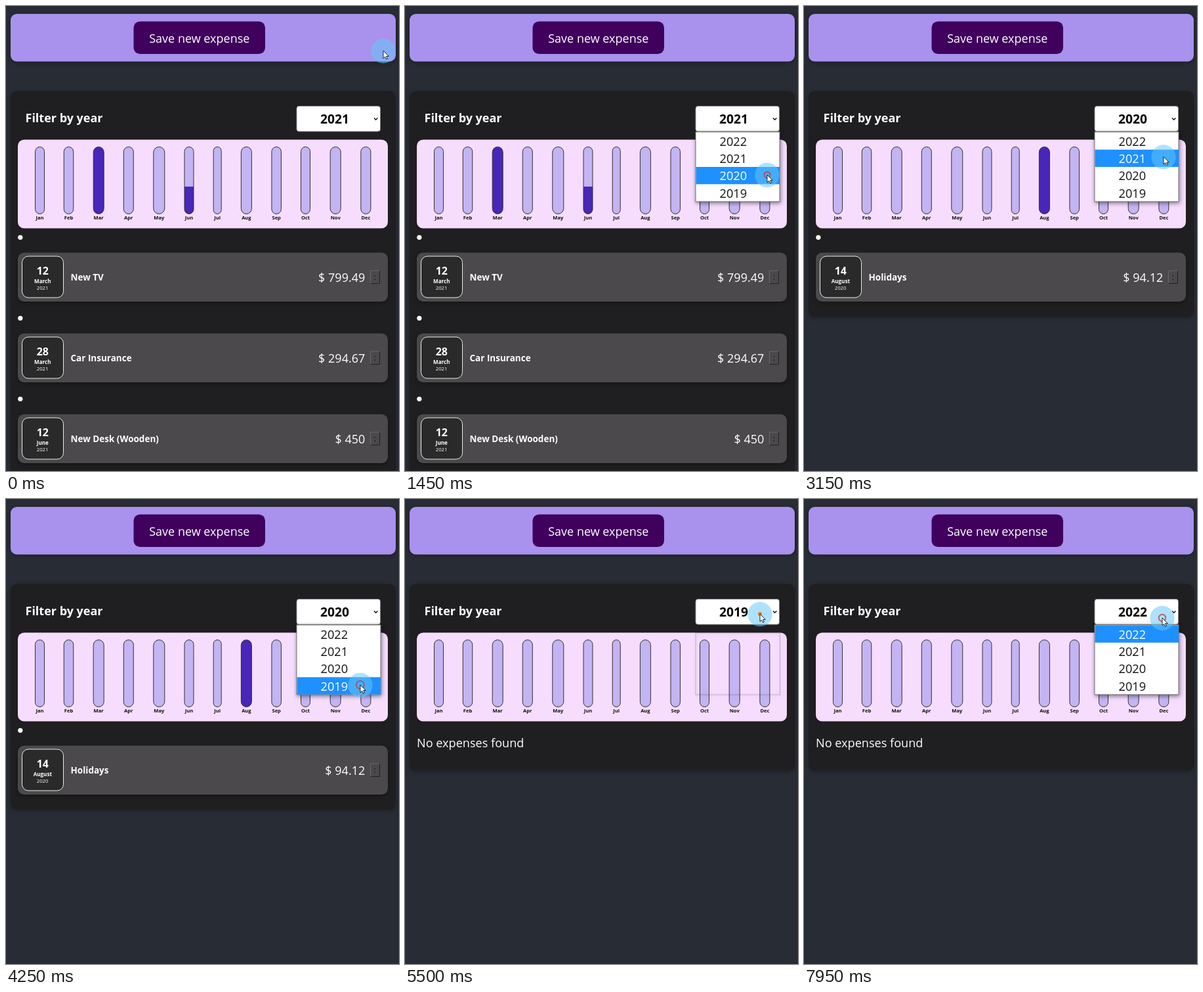
Write an HTML page that moves like this. It is 599 px wide and 708 px high and loops after 8000 ms.

```html
<!DOCTYPE html>
<html lang="en">
<head>
<meta charset="utf-8">
<title>Expenses</title>
<style>
html, body { margin: 0; width: 100%; height: 100%; overflow: hidden; background: #282c34; }
svg { display: block; font-family: "Open Sans", "Noto Sans", sans-serif; }
.card { filter: drop-shadow(0 2px 3px rgba(0, 0, 0, .3)); }
.menu { filter: drop-shadow(1px 2px 3px rgba(0, 0, 0, .5)); }
</style>
</head>
<body>
<svg id="stage" width="599" height="708" viewBox="0 0 599 708"></svg>
<script>
const LOOP = 8000;
const MONTHS = 'Jan Feb Mar Apr May Jun Jul Aug Sep Oct Nov Dec'.split(' ');
const BAR_X = [51.5, 95.5, 141.2, 186.8, 233.3, 279, 322.2, 366.4, 412.2, 456.5, 502.2, 548.4];
const BAR_W = [14, 14.5, 16, 15, 17, 14, 12, 16, 14.5, 14, 16, 15];
const YEARS = [2022, 2021, 2020, 2019];
const ITEMS = {
  2021: [
    [12, 'March', 'New TV', 799.49],
    [28, 'March', 'Car Insurance', 294.67],
    [12, 'June', 'New Desk (Wooden)', 450]
  ],
  2020: [[14, 'August', 'Holidays', 94.12]]
};
const FILLS = { 2021: { Mar: 1, Jun: .41 }, 2020: { Aug: 1 } };

// Timeline in ms
const PICKS = [[0, 2021], [1550, 2020], [4300, 2019], [6700, 2022]];
const MENUS = [[530, 1550], [2780, 4300], [5500, 6700], [7875, LOOP]];
const CLICKS = [530, 1400, 2780, 4150, 5500, 6550, 7875];
const PATH = [
  [0, 575, 68], [50, 575, 68], [450, 559, 169], [580, 559, 169], [700, 559, 182],
  [1100, 552, 257], [1500, 552, 257], [2000, 554, 251], [2500, 551, 174], [2800, 551, 174],
  [3500, 545, 285], [3700, 542, 262], [3900, 540, 283], [4400, 540, 283], [4900, 540, 198],
  [5250, 540, 198], [5350, 541, 175], [5600, 541, 175], [6050, 547, 204], [6750, 547, 204],
  [7100, 556, 176], [7550, 556, 176], [7800, 546, 181], [LOOP, 546, 181]
];

const rect = (x, y, w, h, r, fill, extra = '') =>
  `<rect x="${x}" y="${y}" width="${w}" height="${h}" rx="${r}" fill="${fill}" ${extra}/>`;
const circle = (x, y, r, fill, extra = '') =>
  `<circle cx="${x}" cy="${y}" r="${r}" fill="${fill}" ${extra}/>`;
const text = (s, x, y, size, { fill = '#fff', weight = 400, anchor = 'start' } = {}) =>
  `<text x="${x}" y="${y}" font-size="${size}" fill="${fill}" font-weight="${weight}" text-anchor="${anchor}">${s}</text>`;
const bold = { weight: 700 };

function pointer(t) {
  const i = Math.max(1, PATH.findIndex(p => p[0] > t));
  const [t0, x0, y0] = PATH[i - 1], [t1, x1, y1] = PATH[i];
  const k = (t - t0) / (t1 - t0), e = k * k * (3 - 2 * k);
  return [x0 + (x1 - x0) * e, y0 + (y1 - y0) * e];
}

function header() {
  return rect(7, 12, 587, 72.5, 9.6, '#a892ee', 'class="card"') +
    rect(194.5, 23.5, 200.5, 49.5, 9.6, '#40005d') +
    text('Save new expense', 294.8, 56, 18, { anchor: 'middle' });
}

function chart(year, before, age) {
  const ease = 1 - (1 - Math.min(1, age / 300)) ** 2;
  const bars = MONTHS.map((m, i) => {
    const a = FILLS[before]?.[m] ?? 0, b = FILLS[year]?.[m] ?? 0;
    const level = a + (b - a) * ease, x = BAR_X[i] - BAR_W[i] / 2;
    return `<linearGradient id="g${i}" x1="0" y1="1" x2="0" y2="0">
      <stop offset="${level}" stop-color="#4826b9"/><stop offset="${level}" stop-color="#c3b4f3"/></linearGradient>` +
      rect(x, 214.5, BAR_W[i], 102, BAR_W[i] / 2, `url(#g${i})`, 'stroke="#313131"') +
      text(m, BAR_X[i], 325.3, 7.6, { fill: '#111', weight: 700, anchor: 'middle' });
  });
  return rect(18, 203.5, 564, 135, 9.6, '#f6ddfe') + bars.join('');
}

function item([day, month, name, cost], year, i) {
  const mid = { anchor: 'middle' }, midBold = { ...mid, ...bold };
  return `<g transform="translate(0 ${i * 123})">` +
    circle(21.8, 352.3, 3.6, '#fff') +
    rect(18, 375.5, 564, 74.5, 9.6, '#4b494b', 'class="card"') +
    rect(24.5, 381, 63, 63, 9.6, '#2a2a2a', 'stroke="#ececec"') +
    text(day, 55.8, 408.6, 16, midBold) +
    text(month, 55.8, 421.8, 8.1, midBold) +
    text(year, 55.6, 432.4, 7.8, mid) +
    text(name, 98.5, 418.4, 13.5, bold) +
    text('$ ' + cost, 547.3, 420.2, 18, { anchor: 'end' }) +
    rect(555, 402.5, 14.5, 20.5, 0, '#4b494b') +
    `<path d="M555.5 423V403H569.5" fill="none" stroke="#6a686a"/>
     <path d="M555.5 422.5H569.5V403" fill="none" stroke="#222"/>` +
    text(':', 562.3, 417, 12, { fill: '#111', anchor: 'middle' }) + '</g>';
}

function select(year, open, focused) {
  const box = focused
    ? rect(441.8, 151.3, 130, 41, 4, '#fff') + rect(443.8, 153.3, 126, 37, 2.5, '#fff', 'stroke="#101010" stroke-width="1.5"')
    : rect(443, 152.5, 127.5, 38.5, 3.5, '#fff', 'stroke="#8a8a8a"');
  return box + text(year, 479, 179.4, 19.3, { fill: '#080808', weight: 700 }) +
    '<path d="M561 170.4L563.7 173.2L566.4 170.4" fill="none" stroke="#111" stroke-width="1.5"/>';
}

function menu(year, y, age) {
  if (age < 40) {
    return rect(443, 204, 128.5, 94, 0, 'none', 'stroke="#000" stroke-opacity=".22" class="menu"');
  }
  const hot = y < 193 ? YEARS.indexOf(year) : Math.min(3, Math.floor((y - 192.5) / 26.4));
  return rect(443, 191.8, 128, 106, 0, '#fff', 'stroke="#767676" class="menu"') +
    YEARS.map((v, i) => {
      const top = 192.4 + i * 26.3;
      return (i === hot ? rect(443.5, top, 127.5, 26.3, 0, '#1e90ff') : '') +
        text(v, 479.5, top + 20.4, 18.2, { fill: i === hot ? '#fff' : '#111' });
    }).join('');
}

function cursor(t, [x, y]) {
  const click = CLICKS.filter(c => c <= t).pop(), age = t - click;
  let ring = '';
  if (age < 300) {
    const [cx, cy] = pointer(click), r = 3 + age * .03;
    ring = age < 40
      ? circle(cx, cy, r, '#e67d22')
      : circle(cx, cy, r, 'none', `stroke="#d0383c" stroke-width="2" opacity="${1 - age / 350}"`);
  }
  return circle(x, y + .5, 18.7, '#64c8fa', 'fill-opacity=".52"') + ring +
    `<path transform="translate(${x} ${y})" d="M0 0V11.6L2.7 9.2L4.5 13L6.4 12.2L4.7 8.5H8.3Z"
      fill="#fff" stroke="#111" stroke-width=".9"/>`;
}

function scene(t) {
  const n = PICKS.filter(p => p[0] <= t).length - 1;
  const [since, year] = PICKS[n], before = PICKS[Math.max(0, n - 1)][1];
  const opened = MENUS.find(([a, b]) => t >= a && t < b);
  const items = ITEMS[year], at = pointer(t);
  const height = !items ? 284 : items.length === 1 ? 343 : 600;
  return header() +
    rect(7, 129.5, 587, height, 9.6, '#1f1e20', 'class="card"') +
    text('Filter by year', 29.5, 177, 18, bold) +
    chart(year, n ? before : year, t - since) +
    (items ? items.map((e, i) => item(e, year, i)).join('') : text('No expenses found', 18, 378, 18.1)) +
    select(year, opened, n > 0 && !opened) +
    (opened ? menu(year, at[1], t - opened[0]) : '') +
    cursor(t, at);
}

const stage = document.getElementById('stage');
const start = performance.now();
let last = '';
function frame() {
  const t = Math.floor((performance.now() - start) % LOOP / 50) * 50;
  const next = scene(t);
  if (next !== last) stage.innerHTML = last = next;
  requestAnimationFrame(frame);
}
frame();
</script>
</body>
</html>
```
